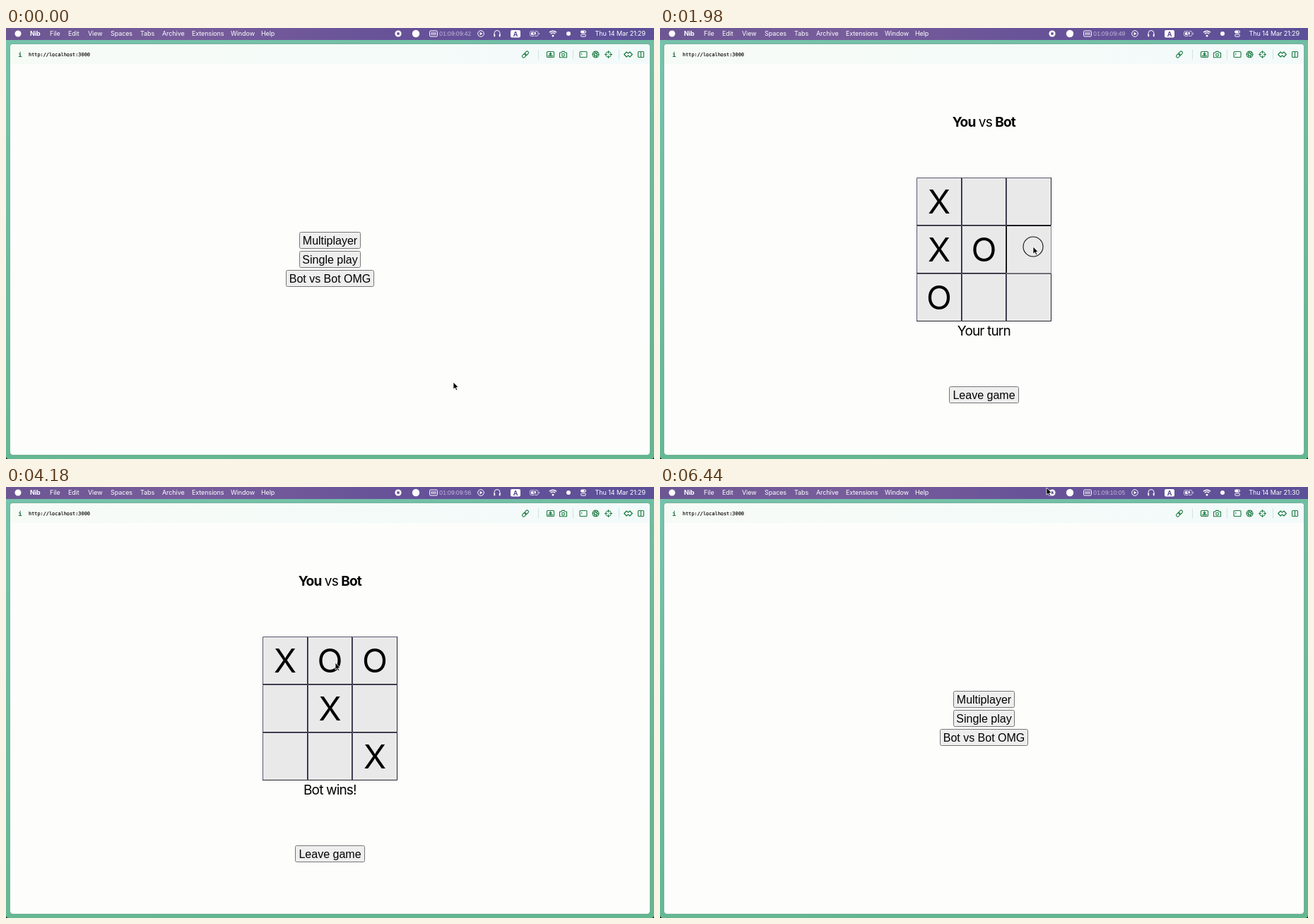
An HTML page for the animation above (6.46 s loop, 917 by 611 pixels).

```html
<!DOCTYPE html>
<html lang="en">
<head>
<meta charset="utf-8">
<title>Tic-tac-toe against a bot</title>
<style>
  html, body { margin: 0; width: 100%; height: 100%; overflow: hidden; background: #111; }
  svg { display: block; width: 100%; height: 100%; }
  text { white-space: pre; }
  .bar { font: 9px Inter, sans-serif; letter-spacing: -.01em; fill: #fff; }
  .bold { font-weight: 700; }
  .count { font-size: 8px; letter-spacing: -.03em; font-variant-numeric: tabular-nums; fill: #c3b8da; }
  .url { font: 6.88px "DejaVu Sans Mono", monospace; fill: #111; stroke: #111; stroke-width: .2; }
  .info { font: bold 9px "DejaVu Sans Mono", monospace; fill: #1c6b3c; }
  .mid { text-anchor: middle; }
  .big { font: 19px Inter, sans-serif; letter-spacing: -.045em; text-anchor: middle; }
  .btn text { font: 16px "Liberation Sans", Arial, sans-serif; text-anchor: middle; }
  .btn rect { fill: #eeeeee; stroke: #767676; }
  .btn.down rect { fill: #f6f6f4; stroke: #b4b4b2; }
  .mark { font: 47px Inter, sans-serif; text-anchor: middle; }
  .cell rect { fill: #e9e9e9; }
  .cell path { fill: none; stroke-width: 1; }
  .cell .lit { stroke: #5a5670; }
  .cell .dim { stroke: #24232b; }
  .cell.down .lit { stroke: #111114; }
  .cell.down .dim { stroke: #858585; }
  .tray { fill: none; stroke: #fff; stroke-width: 1; }
  .tray .solid { fill: #fff; stroke: none; }
  .tools { fill: none; stroke: #1c7a42; stroke-width: 1.1; stroke-linejoin: round; stroke-linecap: round; }
  .tools .sep { stroke: #d3e6dd; }
</style>
</head>
<body>
<svg viewBox="0 0 917 611" preserveAspectRatio="none">
  <defs>
    <linearGradient id="sky">
      <stop offset="0" stop-color="#6c5793"/>
      <stop offset=".28" stop-color="#785d9b"/>
      <stop offset=".6" stop-color="#675298"/>
      <stop offset="1" stop-color="#5c5098"/>
    </linearGradient>
    <linearGradient id="desk" x2=".35" y2="1">
      <stop offset="0" stop-color="#76c3ac"/>
      <stop offset=".5" stop-color="#6dbb9f"/>
      <stop offset="1" stop-color="#62b790"/>
    </linearGradient>
    <linearGradient id="tool">
      <stop offset="0" stop-color="#f6fbf6"/>
      <stop offset="1" stop-color="#f3fafa"/>
    </linearGradient>
  </defs>

  <rect width="917" height="611" rx="4" fill="url(#desk)"/>
  <rect width="917" height="17" fill="url(#sky)"/>
  <rect x="5.5" y="22.5" width="906" height="583" rx="4.5" fill="#fdfdfc" stroke="#4b9477" stroke-opacity=".6"/>
  <path d="M6 51V27a4 4 0 0 1 4-4H907a4 4 0 0 1 4 4V51Z" fill="url(#tool)"/>

  <g class="bar" id="menuBar">
    <circle cx="17" cy="8" r="4.5"/>
    <text class="count" x="613" y="11" id="count"></text>
    <text x="905" y="11" text-anchor="end" id="clock"></text>
  </g>

  <g class="tray">
    <circle class="solid" cx="555" cy="8" r="4.6"/>
    <rect x="553.3" y="6.3" width="3.4" height="3.4" rx=".5" fill="#68529a" stroke="none"/>
    <circle class="solid" cx="580" cy="8" r="5.2"/>
    <rect x="599.5" y="4" width="11" height="8" rx="1.5"/>
    <path d="M602 6v4M604 6v4M606 6v4M608 6v4"/>
    <circle cx="672" cy="8" r="4.3"/>
    <path class="solid" d="M670.6 5.7v4.6l3.8-2.3z"/>
    <path d="M691 10V7.5a4 4 0 0 1 8 0V10"/>
    <path d="M691.3 8.8v3.4M698.7 8.8v3.4" stroke-width="1.8"/>
    <rect class="solid" x="714" y="3" width="14" height="10.5" rx="2"/>
    <rect x="741.5" y="4.5" width="11.5" height="7" rx="2" stroke="#cfc5e4"/>
    <path d="M754.5 7v2" stroke="#cfc5e4"/>
    <rect class="solid" x="743" y="6" width="7" height="4" rx="1"/>
    <path d="M748.5 3.5l-2.5 5h3l-1.5 4" stroke="#5f4f96" stroke-width=".9"/>
    <path d="M769 6.2a7.2 7.2 0 0 1 10 0M770.8 8.3a4.6 4.6 0 0 1 6.4 0" stroke-width="1.4"/>
    <circle class="solid" cx="774" cy="11" r="1.5"/>
    <circle class="solid" cx="796" cy="8" r="3"/>
    <rect class="solid" x="813" y="3.5" width="8" height="4" rx="2"/>
    <rect x="813.5" y="9" width="7" height="3.2" rx="1.6"/>
    <circle cx="819" cy="5.5" r="1" fill="#5f4f96" stroke="none"/>
  </g>
  <text class="bar bold mid" x="721" y="11.5" style="fill:#5d4a90">A</text>

  <text class="info" x="17.3" y="41">i</text>
  <text class="url" x="32" y="40">http://localhost:3000</text>

  <g class="tools">
    <g transform="rotate(-45 735 37.5)">
      <rect x="729.5" y="35.5" width="6.2" height="4" rx="2"/>
      <rect x="734.3" y="35.5" width="6.2" height="4" rx="2"/>
    </g>
    <path class="sep" d="M753.5 31v13M802.5 31v13M867.5 31v13"/>
    <rect x="765.5" y="33.5" width="10" height="8" rx="1"/>
    <path d="M767.5 39.5h6M770.5 35v3M769 36.5l1.5 1.5 1.5-1.5" stroke-width="1.3"/>
    <path d="M783.5 35h2.3l1-1.6h3.4l1 1.6h2.3v6.8h-10z"/>
    <circle cx="788.5" cy="38.2" r="1.9"/>
    <rect x="812" y="33.5" width="10" height="8" rx="1"/>
    <path d="M814 35.7l1.3 1.1-1.3 1.1" stroke-width=".8"/>
    <circle cx="834.5" cy="37.5" r="4.4"/>
    <path id="blades"/>
    <circle cx="852.5" cy="37.5" r="3.8"/>
    <path d="M852.5 32.5v3M852.5 39.5v3M847.5 37.5h3M854.5 37.5h3"/>
    <path d="M874.7 37.5l3.4-3.5 2.4 2 2.4-2 3.4 3.5-3.4 3.5-2.4-2-2.4 2z" stroke-width="1.2"/>
    <rect x="894.5" y="33.5" width="8" height="8" rx="1"/>
    <path d="M898.5 33.5v8"/>
  </g>

  <g id="menu"></g>
  <g id="game">
    <text class="big" x="458.3" y="139.7"><tspan class="bold">You</tspan> vs <tspan class="bold">Bot</tspan></text>
    <text class="big" x="458.3" y="435.5" id="status"></text>
  </g>

  <circle id="ring" r="14" fill="none" stroke="#111" stroke-width="1.1"/>
  <path id="cursor" d="M0 0V10.2L2.4 8.1 4 11.7 5.7 11 4.2 7.4H7.2Z"
        fill="#000" stroke="#fff" stroke-width=".8" stroke-linejoin="round"/>
</svg>

<script>
const LOOP = 6460;
const $ = id => document.getElementById(id);

function add(parent, tag, attrs, text) {
  const el = document.createElementNS('http://www.w3.org/2000/svg', tag);
  for (const key in attrs) el.setAttribute(key, attrs[key]);
  if (text) el.textContent = text;
  return parent.appendChild(el);
}

function button(parent, label, y, width) {
  const g = add(parent, 'g', { class: 'btn' });
  add(g, 'rect', { x: 458.5 - width / 2, y, width, height: 23, rx: 2 });
  add(g, 'text', { x: 458.5, y: y + 17 }, label);
  return g;
}

[['Nib', 34], ['File', 62], ['Edit', 88], ['View', 116], ['Spaces', 148], ['Tabs', 190],
 ['Archive', 221], ['Extensions', 263], ['Window', 318], ['Help', 361]]
  .forEach(([label, x], i) => add($('menuBar'), 'text', { x, y: 11, class: i ? '' : 'bold' }, label));

let blades = '';
for (let i = 0; i < 6; i++) {
  const point = (r, a) => (834.5 + r * Math.cos(a)) + ' ' + (37.5 + r * Math.sin(a));
  const a = i * Math.PI / 3;
  blades += `M${point(4.4, a)}L${point(1.8, a + 1.3)}`;
}
$('blades').setAttribute('d', blades);

button($('menu'), 'Multiplayer', 289.5, 86);
const play = button($('menu'), 'Single play', 316.5, 86);
button($('menu'), 'Bot vs Bot OMG', 343.5, 124);
const leave = button($('game'), 'Leave game', 508.5, 98);

const column = i => Math.round(363 + i * 63.67);
const row = i => Math.round(212 + i * 67.9);
const cells = [...Array(9).keys()].map(i => {
  const c = i % 3, r = Math.floor(i / 3);
  const x = column(c), y = row(r), right = column(c + 1), bottom = row(r + 1);
  const g = add($('game'), 'g', { class: 'cell' });
  add(g, 'rect', { x, y, width: right - x, height: bottom - y });
  add(g, 'path', { class: 'lit', d: `M${x + .5} ${bottom}V${y + .5}H${right}` });
  add(g, 'path', { class: 'dim', d: `M${right - .5} ${y}V${bottom - .5}H${x}` });
  const mark = add(g, 'text', { class: 'mark', x: (x + right) / 2, y: y + 51 });
  return { g, mark };
});

// Presses: step, x, y, action (a number is a cell), the bot's cell, closing message
const clicks = [
  [8, 470, 333, 'play'],
  [17, 482, 331, 4, 0],
  [28, 395, 385, 6, 3],
  [43, 528, 310, 5, 8],
  [51, 522, 250, 2, null, 'You win!'],
  [59, 462, 522, 'leave'],
  [68, 470, 333, 'play', 4],
  [76, 522, 249, 2, 0],
  [85, 466, 249, 1, 8, 'Bot wins!'],
  [95, 462, 522, 'leave'],
  [100, 470, 333, 'play'],
  [104, 395, 249, 0, 3],
  [107, 522, 306, 5, 1],
  [111, 466, 306, 4, 6],
  [117, 522, 380, 8, null, 'You win!'],
  [125, 462, 522, 'leave'],
  [140, 547, 1, null]
];
const HOLD = 2, TRAVEL = 3;

// Steps come in threes, lasting 20, 20 and 100 ms
function stepAt(ms) {
  const p = ms + 20, rest = p % 140;
  return 3 * Math.floor(p / 140) + (rest < 20 ? 0 : rest < 40 ? 1 : 2);
}

function cursorAt(step) {
  let x = 633, y = 502, free = 1;
  for (const [press, nx, ny] of clicks) {
    const arrive = Math.max(press - 2, free + 1);
    const start = Math.max(free, arrive - TRAVEL);
    if (step <= start) break;
    const k = Math.min(1, (step - start) / (arrive - start));
    const ease = k * k * (3 - 2 * k);
    x += (nx - x) * ease;
    y += (ny - y) * ease;
    if (k < 1) break;
    free = press + HOLD;
  }
  return [x, y];
}

function stateAt(step) {
  const state = { inGame: false, board: [], status: '', down: null, ring: false };
  for (const [press, , , act, reply, message] of clicks) {
    if (step < press) break;
    if (step < press + HOLD) {
      state.down = act;
      state.ring = step > press;
      break;
    }
    if (act === 'leave') { state.inGame = false; continue; }
    if (act === 'play') { state.inGame = true; state.board = []; }
    else state.board[act] = 'O';
    if (reply != null) state.board[reply] = 'X';
    state.status = message || 'Your turn';
  }
  return state;
}

const two = v => String(v).padStart(2, '0');

function render(step) {
  const s = stateAt(step), [x, y] = cursorAt(step);
  const secs = 42 + Math.floor((step - 1) / 6);
  $('count').textContent = `01:09:${two(9 + Math.floor(secs / 60))}:${two(secs % 60)}`;
  $('clock').textContent = 'Thu 14 Mar 21:' + (secs < 58 ? 29 : 30);
  $('menu').style.display = s.inGame ? 'none' : '';
  $('game').style.display = s.inGame ? '' : 'none';
  $('status').textContent = s.status;
  play.classList.toggle('down', s.down === 'play');
  leave.classList.toggle('down', s.down === 'leave');
  cells.forEach(({ g, mark }, i) => {
    g.classList.toggle('down', s.down === i);
    mark.textContent = s.board[i] || '';
  });
  const place = `translate(${x} ${y})`;
  $('cursor').setAttribute('transform', place);
  $('ring').setAttribute('transform', place);
  $('ring').style.display = s.ring ? '' : 'none';
}

const begin = performance.now();
let shown = -1;
function tick() {
  const step = stepAt((performance.now() - begin) % LOOP);
  if (step !== shown) render(shown = step);
  requestAnimationFrame(tick);
}
tick();
</script>
</body>
</html>
```
